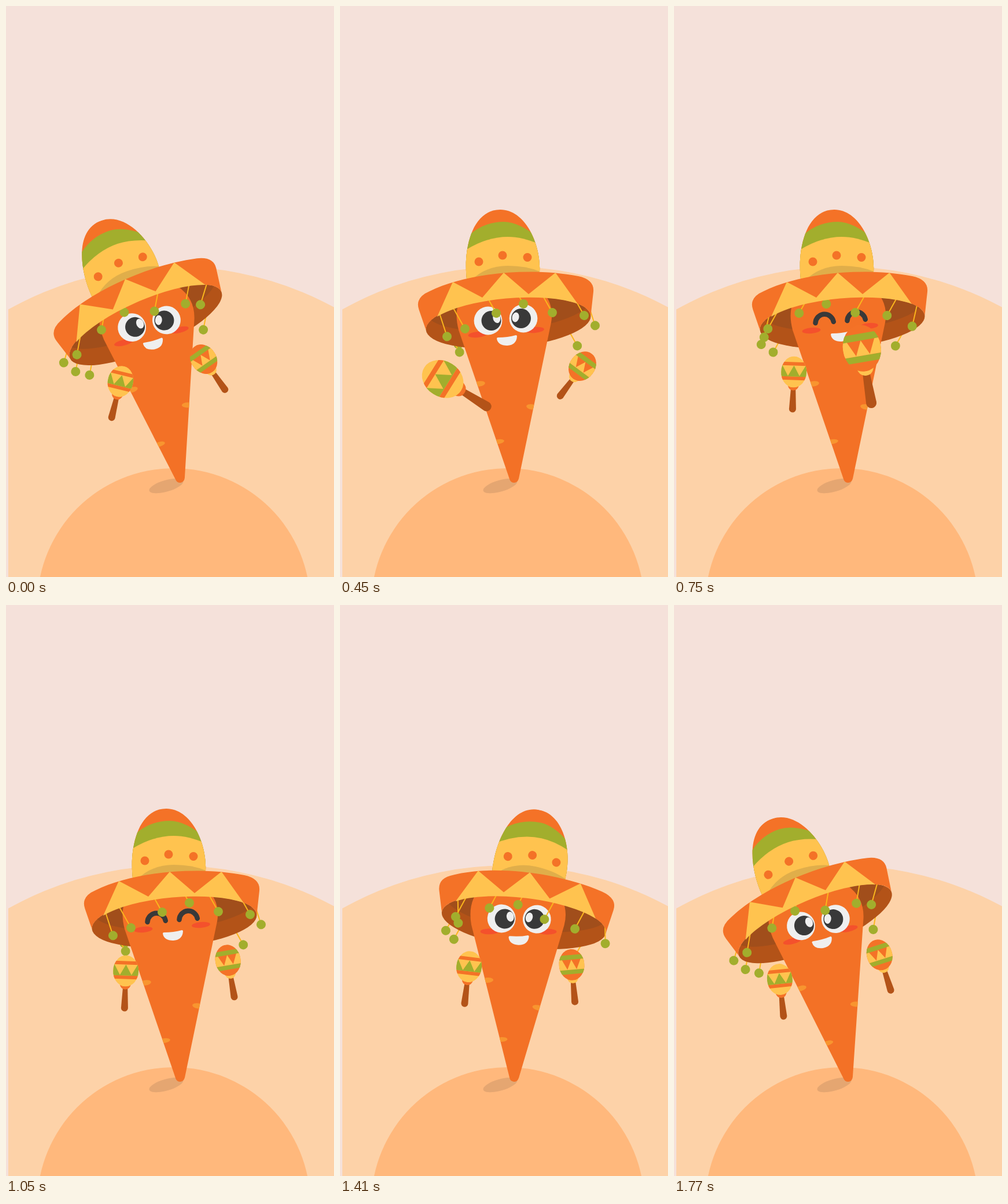
Recreate the animation shown at these times as an HTML page. Size 567 by 987 pixels, loop 1.8 s.

```html
<!DOCTYPE html>
<html lang="en">
<head>
<meta charset="utf-8">
<title>Dancing carrot</title>
<style>
html, body { margin: 0; width: 100%; height: 100%; overflow: hidden; background: #f5e1da; }
svg { display: block; width: 100%; height: 100%; }
.orange { fill: #f47227; }
.yellow { fill: #ffc34f; }
.green { fill: #a2ae2d; }
.brown { fill: #b35318; }
.white { fill: #efefef; }
.dark { fill: #393939; }
.spot { fill: #f8952f; }
.blush { fill: #f4512c; }
.thread { stroke: #fbb61d; stroke-width: 2; }
.smile { fill: none; stroke: #393939; stroke-width: 8.5; stroke-linecap: round; }
</style>
</head>
<body>
<svg viewBox="0 0 567 987">
  <defs>
    <path id="bodyShape" d="M293.500 819L205 560Q194.500 520 216 495L345 488Q371 512 365 547L309 817Q307 824 301 824Q295.500 824 293.500 819Z"/>
    <path id="crownShape" d="M219 472C213 420 228 352 277 352C322 352 348 415 345 460V490H221Z"/>
    <ellipse id="underside" cx="291" cy="547.5" rx="143" ry="43" transform="rotate(-5 291 547.5)"/>
    <clipPath id="bodyClip"><use href="#bodyShape"/></clipPath>
    <clipPath id="crownClip"><use href="#crownShape"/></clipPath>
    <clipPath id="underClip"><use href="#underside"/></clipPath>
    <clipPath id="groundClip"><rect x="4" y="400" width="563" height="587"/></clipPath>
    <clipPath id="headClip"><ellipse rx="22" ry="27"/></clipPath>
  </defs>

  <rect width="567" height="987" fill="#f5e1da"/>
  <circle cx="289" cy="1033.2" r="583" fill="#fdd2a8" clip-path="url(#groundClip)"/>
  <circle cx="290" cy="1035" r="236" fill="#ffb87c"/>
  <ellipse cx="277" cy="829.5" rx="30.5" ry="10" fill="#e5a671" transform="rotate(-16 277 829.5)"/>

  <g class="hat">
    <g id="backPoms"></g>
    <use href="#underside" class="brown"/>
    <g clip-path="url(#underClip)"><use href="#underside" y="-30" fill="#a14e1b"/></g>
    <g clip-path="url(#crownClip)">
      <rect class="orange" x="200" y="340" width="160" height="150"/>
      <path class="green" d="M205 415Q238 373 283 373Q312 373 350 407V490H205Z"/>
      <path class="yellow" d="M205 430Q248 399 290 399Q317 399 350 414V490H205Z"/>
      <path fill="#e0ae4a" d="M226 475Q252 449 290 449Q325 449 350 461V490H226Z"/>
      <g class="orange">
        <circle cx="240" cy="442" r="7.5"/><circle cx="281" cy="431" r="7.5"/><circle cx="324" cy="434.5" r="7.5"/>
      </g>
    </g>
  </g>

  <g class="body">
    <use href="#bodyShape" fill="#f37126"/>
    <g class="spot" clip-path="url(#bodyClip)">
      <ellipse cx="241" cy="653" rx="10" ry="4.5" transform="rotate(-8 241 653)"/>
      <ellipse cx="332" cy="693" rx="10" ry="4.5" transform="rotate(8 332 693)"/>
      <ellipse cx="274" cy="753" rx="10" ry="4" transform="rotate(-8 274 753)"/>
    </g>
    <g id="face">
      <g id="lowerFace">
        <ellipse class="blush" cx="237.5" cy="568" rx="16" ry="5" transform="rotate(-5 237.5 568)"/>
        <ellipse class="blush" cx="337" cy="560" rx="16" ry="5" transform="rotate(-5 337 560)"/>
        <path class="white" d="M271 575Q271 573 273 573Q290 573 304 569Q306 569 306 571Q305 586 289 587Q273 587 271 575Z"/>
      </g>
      <g id="openEyes">
        <circle class="white" cx="256" cy="544" r="24.4"/><circle class="dark" cx="261.5" cy="544" r="17"/>
        <ellipse class="white" cx="270.8" cy="539.5" rx="6.3" ry="8.7" transform="rotate(-15 270.8 539.5)"/>
        <circle class="white" cx="317" cy="540" r="24.4"/><circle class="dark" cx="313" cy="540" r="17"/>
        <ellipse class="white" cx="303.5" cy="538" rx="6" ry="8.5" transform="rotate(12 303.5 538)"/>
      </g>
      <path id="closedEyes" class="smile" d="M244.500 548A15.800 16 0 0 1 275.800 545.700M299.500 544A15.800 16 0 0 1 330.800 541.700"/>
    </g>
  </g>

  <g class="hat">
    <g id="frontPoms"></g>
    <path class="orange" d="M148.500 560L136.500 525Q129 504 155 493C215 463 325 450 412 467Q440 473 438 494L433.500 535A143 43 -5 0 0 148.500 560Z"/>
    <path class="yellow" d="M168 537L195 477L246 504L283 461L326 498L372.500 461L411 515A143 43 -5 0 0 168 537Z"/>
  </g>

  <g class="body">
    <g id="leftMaraca">
      <path class="brown" d="M-4 27H4L6 64A6 6 0 0 1 -6 64Z"/>
      <path class="orange" d="M-10 22H10Q8 32 0 32Q-8 32 -10 22Z"/>
      <g clip-path="url(#headClip)">
        <rect class="yellow" x="-22" y="-27" width="44" height="54"/>
        <path class="orange" d="M-22-17H22V-11H-22ZM-22 8H22V14H-22Z"/>
        <path class="green" d="M-22 8V-11H-20L-10 7L0-11L10 7L20-11H22V8Z"/>
      </g>
    </g>
    <g id="rightMaraca">
      <path class="brown" d="M-4 27H4L6 64A6 6 0 0 1 -6 64Z"/>
      <path class="yellow" d="M-10 22H10Q8 32 0 32Q-8 32 -10 22Z"/>
      <g clip-path="url(#headClip)">
        <rect class="orange" x="-22" y="-27" width="44" height="54"/>
        <path class="green" d="M-22-17H22V-9H-22ZM-22 8.500H22V16H-22Z"/>
        <path class="yellow" d="M-22-9H-16L-8 8L0-9L8 8L16-9H22V8.500H-22Z"/>
      </g>
    </g>
  </g>
</svg>
<script>
const LOOP = 1800, SWAY = 600, STEP = 30;
const $ = id => document.getElementById(id);
const all = selector => document.querySelectorAll(selector);

// Cosine-eased value between [time, value] keys.
function ease(keys, t) {
  const i = keys.findIndex(k => k[0] > t);
  if (i < 0) return keys[keys.length - 1][1];
  const [t0, a] = keys[i - 1], [t1, b] = keys[i];
  return a + (b - a) * (1 - Math.cos(Math.PI * (t - t0) / (t1 - t0))) / 2;
}

const bump = (t, start, end) =>
  t > start && t < end ? Math.sin(Math.PI * (t - start) / (end - start)) : 0;

// Sideways swing of a 55 px thread over one sway.
const swing = [[0, -27], [140, -27], [370, 28], [450, 27], [585, -27], [600, -27]];
const edgeSwing = [[0, -32], [90, -32], [220, 13], [450, 17], [580, -31], [600, -32]];
const leftTilt = [[0, 20], [200, -60], [450, -60], [600, 0], [1770, 0], [1800, 20]];
const rightTilt = [[0, -17], [200, 46], [450, 46.5], [600, 0], [1770, 0], [1800, -17]];

function makePom(layer, keys, x, y, length = 55) {
  const g = document.createElementNS("http://www.w3.org/2000/svg", "g");
  g.innerHTML = `<line class="thread" y2="${length}"/><circle class="green" cy="${length}" r="8"/>`;
  $(layer).append(g);
  return { g, keys, x, y };
}

const poms = [
  makePom("backPoms", swing, 177.5, 537),
  makePom("backPoms", swing, 189, 567, 36),
  makePom("backPoms", swing, 396.5, 563, 28),
  makePom("frontPoms", edgeSwing, 168, 519),
  makePom("frontPoms", swing, 189, 510),
  makePom("frontPoms", swing, 243, 483),
  makePom("frontPoms", swing, 290, 467),
  makePom("frontPoms", swing, 340, 482),
  makePom("frontPoms", swing, 395, 487),
  makePom("frontPoms", edgeSwing, 424, 500)
];

function placeMaraca(id, x, y, angle, scale, grip) {
  $(id).setAttribute("transform",
    `translate(${x} ${y}) rotate(${angle}) scale(${scale}) translate(0 ${-grip})`);
}

function draw(t) {
  const beat = t % SWAY;
  const c = Math.cos(2 * Math.PI * t / SWAY);

  all(".body").forEach(g => g.setAttribute("transform", `rotate(${-8.25 * c} 301 817)`));
  const hatX = 283 - 77 * c, hatY = 461 + 8.3 * c * c + 2.7 * c;
  const hatAngle = -20 * c + 1.25 * c * c;
  all(".hat").forEach(g => g.setAttribute("transform",
    `translate(${hatX} ${hatY}) rotate(${hatAngle}) translate(-283 -461)`));

  for (const { g, keys, x, y } of poms) {
    const angle = -Math.asin(ease(keys, beat) / 55) * 180 / Math.PI;
    g.setAttribute("transform", `translate(${x} ${y}) rotate(${angle})`);
  }

  // The face sinks a little at both ends of the sway.
  $("face").setAttribute("transform", `translate(0 ${2.4 * c * c})`);
  const happy = t >= 600 && t < 1200;
  $("openEyes").style.display = happy ? "none" : "";
  $("closedEyes").style.display = happy ? "" : "none";
  $("lowerFace").setAttribute("transform", `translate(0 ${happy ? -7 : 0})`);

  const leftNear = 0.56 * bump(t, 0, 600), rightNear = 0.577 * bump(t, 600, 1050);
  placeMaraca("leftMaraca", 205.5 + 70 * leftNear, 679.5, 2 + ease(leftTilt, t), 1 + leftNear, 47);
  placeMaraca("rightMaraca", 391.5 - 110 * rightNear, 659.5, -9.8 + ease(rightTilt, t), 1 + rightNear, 46);
}

const start = performance.now();
function tick() {
  const t = (performance.now() - start) % LOOP;
  draw(Math.floor(t / STEP) * STEP);
  requestAnimationFrame(tick);
}
tick();
</script>
</body>
</html>
```
